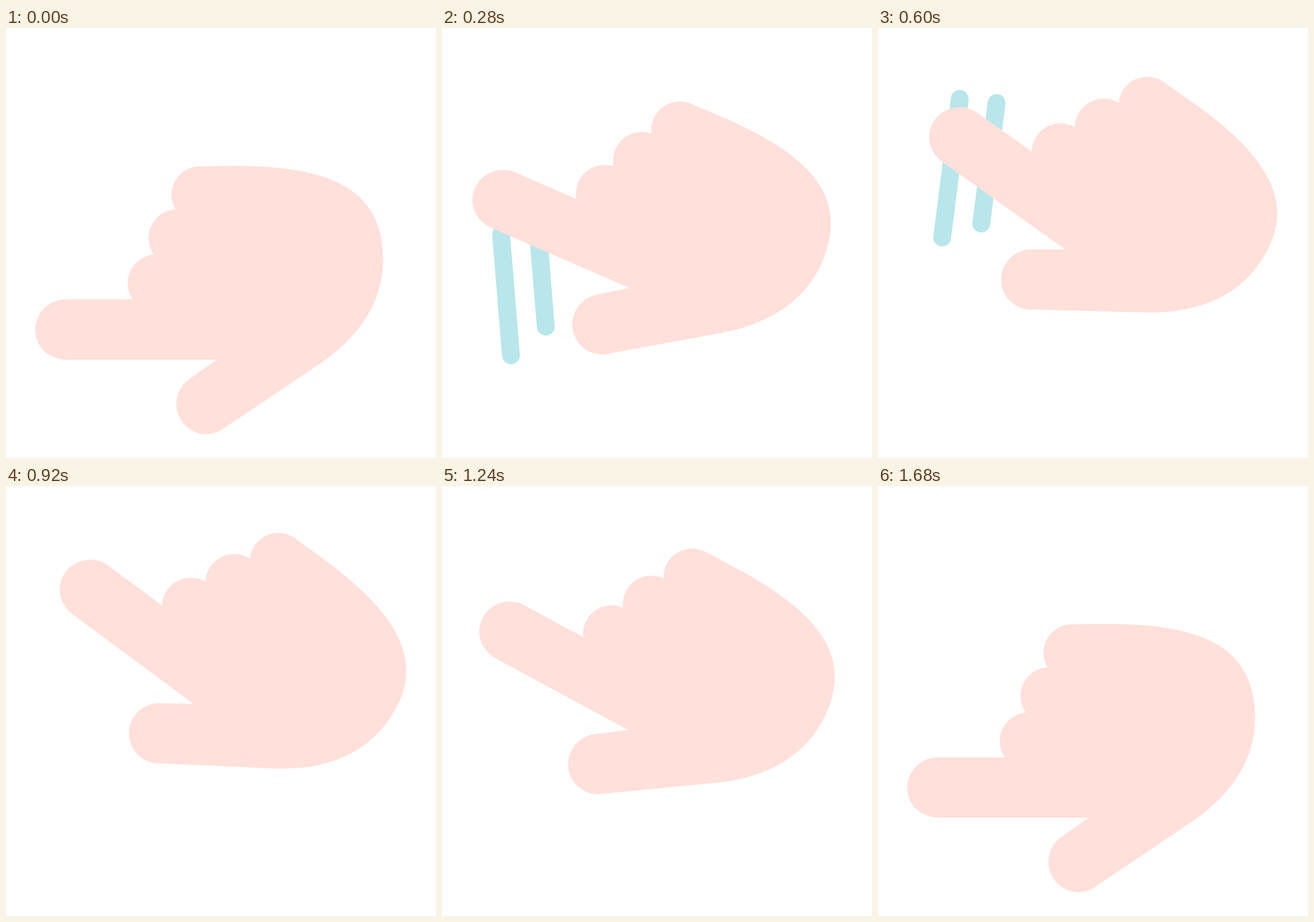
An HTML page without scripts for the animation above (2 s loop, 748 by 748 pixels).

```html
<!DOCTYPE html>
<html lang="en">
<head>
<meta charset="utf-8">
<title>Swiping hand</title>
<style>
  html, body { margin: 0; width: 100%; height: 100%; overflow: hidden; background: #fff; }
  svg { display: block; width: 100vw; height: 100vh; }
  .hand { fill: #ffe0da; }
  .streaks { stroke: #b8e6eb; stroke-width: 31; stroke-linecap: round; }
</style>
</head>
<body>
<svg viewBox="0 0 748 748">
  <g>
    <!-- swing up, then fall back around the wrist -->
    <animateTransform attributeName="transform" type="rotate" dur="2s" repeatCount="indefinite"
      values="0 646.5 417; 37 646.5 417; 0 646.5 417; 0 646.5 417" keyTimes="0; .4; .84; 1"
      calcMode="spline" keySplines=".106 0 .264 1; .72 0 .75 1; 0 0 1 1"/>

    <!-- y1 is the leading end of a streak, y2 the trailing end -->
    <g class="streaks" visibility="hidden">
      <animate attributeName="visibility" dur="2s" repeatCount="indefinite"
        values="hidden; visible; hidden" keyTimes="0; .01; .44" calcMode="discrete"/>
      <line transform="translate(60 460) rotate(-28.2)" y1="368" y2="368">
        <animate attributeName="y1" dur="2s" repeatCount="indefinite" values="368; 0; 0" keyTimes="0; .38; 1"
          calcMode="spline" keySplines=".17 0 .275 1; 0 0 1 1"/>
        <animate attributeName="y2" dur="2s" repeatCount="indefinite" values="368; 0; 0" keyTimes="0; .44; 1"
          calcMode="spline" keySplines=".85 0 1 1; 0 0 1 1"/>
      </line>
      <line transform="translate(117 430) rotate(-28.2)" y1="320" y2="320">
        <animate attributeName="y1" dur="2s" repeatCount="indefinite" values="320; 0; 0" keyTimes="0; .38; 1"
          calcMode="spline" keySplines=".17 0 .275 1; 0 0 1 1"/>
        <animate attributeName="y2" dur="2s" repeatCount="indefinite" values="320; 0; 0" keyTimes="0; .44; 1"
          calcMode="spline" keySplines=".85 0 1 1; 0 0 1 1"/>
      </line>
    </g>

    <path class="hand" d="M366.5 577 H108 C72 577 51 553 51 525 C51 496 75 472 104 472 H220.5
      A50 50 0 0 1 257 394 A50 50 0 0 1 295 315.5 A49.5 49.5 0 0 1 337 240.5
      L410 240 C555 242 656 275 656 403 C656 485 604 545 543 586
      L381 695 A52 52 0 0 1 296.5 654 A52 52 0 0 1 320 610 Z"/>
  </g>
</svg>
</body>
</html>
```
